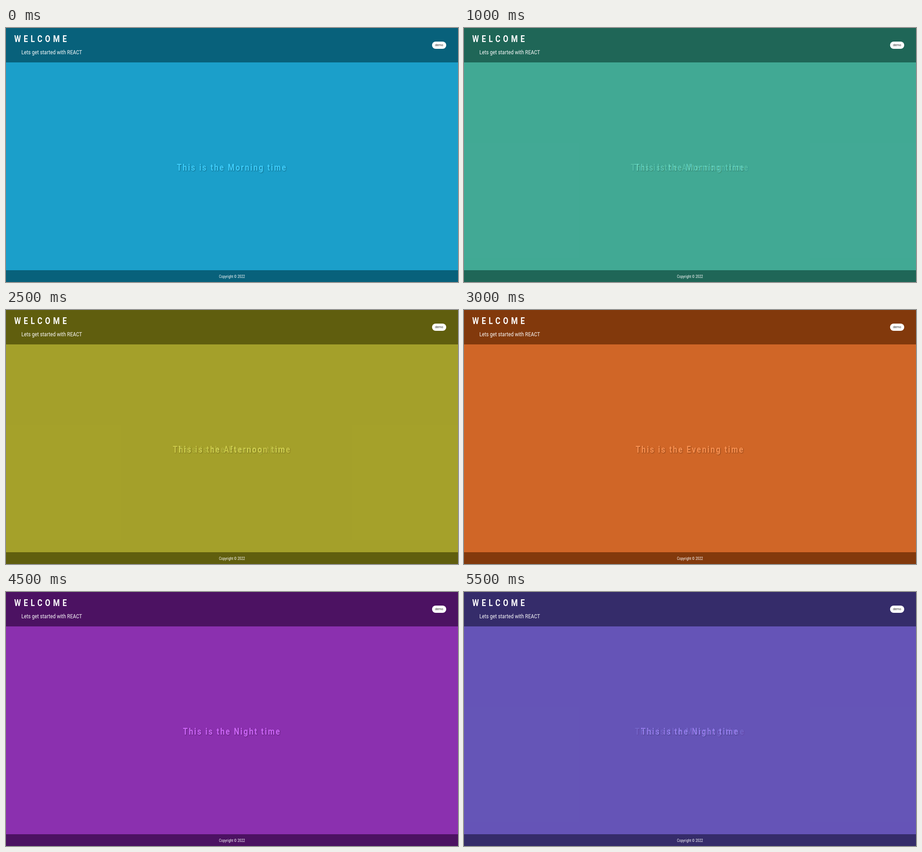
Animation, 998 px wide and 561 px high, one loop 6 s. Source, as an HTML page:

```html
<!DOCTYPE html>
<html lang="en">
<head>
<meta charset="utf-8">
<title>Time of day</title>
<style>
  html, body { margin: 0; width: 100%; height: 100%; overflow: hidden; }
  svg { display: block; width: 100%; height: 100%; }
  text { font-family: Roboto, "Liberation Sans", sans-serif; fill: #fff; }
  .title { font-size: 20.6px; font-weight: 600; letter-spacing: 7.6px; }
  .sub { font-size: 13px; letter-spacing: .15px; }
  .foot { font-size: 9.1px; text-anchor: middle; }
  .headline { font-size: 20.8px; font-weight: 600; letter-spacing: 3.05px; text-anchor: middle; }
  .shadow { filter: drop-shadow(1px 1.5px 1px rgba(0, 0, 0, .35)); }
  .button { font: 6.7px "Open Sans", "Noto Sans", sans-serif; fill: #111; text-anchor: middle; }
</style>
</head>
<body>
<svg id="stage" viewBox="0 0 998 561" preserveAspectRatio="none"></svg>
<script>
const HOLD = 1000, BLEND = 500, STEP = HOLD + BLEND;
const MIX = 0.335;      // strength of the next scene while blending
const NARROW = 0.81;    // one condensed face for all headings

const scenes = [
  { name: "Morning",   bar: "#08617b", page: "#1b9fca", ink: "#3dcdfb" },
  { name: "Afternoon", bar: "#4f7110", page: "#8fbe2c", ink: "#c6fb58" },
  { name: "Evening",   bar: "#82390c", page: "#d06627", ink: "#fb9150" },
  { name: "Night",     bar: "#4c1262", page: "#8b30af", ink: "#cd66f8" }
];

const stage = document.getElementById("stage");

function add(parent, tag, attrs, text) {
  const node = document.createElementNS("http://www.w3.org/2000/svg", tag);
  for (const key in attrs) node.setAttribute(key, attrs[key]);
  if (text) node.textContent = text;
  return parent.appendChild(node);
}

function rect(parent, y, height, fill) {
  return add(parent, "rect", { x: 0, y, width: 998, height, fill });
}

function label(parent, cls, x, y, text) {
  const transform = `translate(${x} ${y}) scale(${NARROW} 1)`;
  return add(parent, "text", { class: cls, transform }, text);
}

const layers = scenes.map(({ name, bar, page, ink }) => {
  const layer = add(stage, "g", {});
  rect(layer, 0, 561, page);
  rect(layer, 0, 76, bar);
  rect(layer, 535, 26, bar);
  const group = add(layer, "g", { class: "shadow" });
  label(group, "headline", 498.9, 315.3, `This is the ${name} time`).style.fill = ink;
  return layer;
});

const front = add(stage, "g", {});
label(front, "title", 18.2, 31.3, "WELCOME");
label(front, "sub", 33.9, 58, "Lets get started with REACT");
label(front, "foot", 499, 551.7, "Copyright © 2022");
add(front, "rect", { x: 940.7, y: 30, width: 31.3, height: 16, rx: 8, fill: "#fff" });
add(front, "text", { class: "button", x: 956.3, y: 40.4 }, "demo");

function draw(time) {
  const t = time % (STEP * scenes.length);
  const now = Math.floor(t / STEP);
  const next = (now + 1) % scenes.length;
  const blending = t % STEP >= HOLD;
  layers.forEach((layer, i) => {
    const shown = i === now || (blending && i === next);
    layer.style.display = shown ? "" : "none";
    layer.style.opacity = 1;
  });
  if (blending) {
    // the upper of the two layers carries the mix
    const top = Math.max(now, next);
    layers[top].style.opacity = top === next ? MIX : 1 - MIX;
  }
}

let start = null;
function tick(time) {
  if (start === null) start = time;
  draw(time - start);
  requestAnimationFrame(tick);
}
draw(0);
requestAnimationFrame(tick);
</script>
</body>
</html>
```
